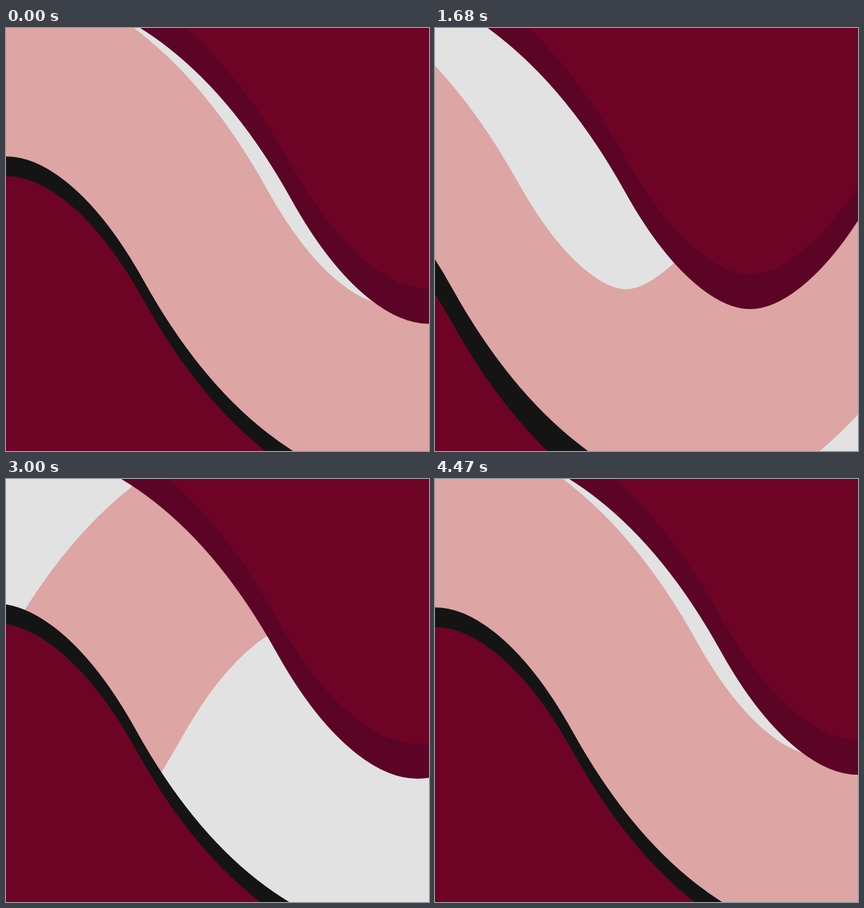
An HTML page with a canvas for the animation above (4.5 s loop, 748 by 748 pixels).

```html
<!DOCTYPE html>
<html>
<head>
<meta charset="utf-8">
<style>
html, body { margin: 0; height: 100%; overflow: hidden; background: #6e0425; }
canvas { display: block; }
</style>
</head>
<body>
<canvas id="stage" width="748" height="748"></canvas>
<script>
const ctx = document.getElementById('stage').getContext('2d');
const SIZE = 748, PERIOD = 2 * SIZE, STEPS = 149, STEP_MS = 30, MID = 375;

// Looping keys: [step, half thickness of the band, lead of the pink ribbon]
const KEYS = [
  [0, 149, -73], [36, 128.5, -107], [56, 175, -220],
  [72, 161, -71], [100, 142, 548], [133, 107, 229.5]
];

function key(i) {
  const n = KEYS.length, lap = Math.floor(i / n);
  const [step, ...values] = KEYS[i - lap * n];
  return [step + lap * STEPS, ...values];
}

// Smooth periodic curve through one column of the keys
function sample(step, col) {
  let i = 0;
  while (key(i + 1)[0] <= step) i++;
  const [a, b, c, d] = [-1, 0, 1, 2].map(k => key(i + k));
  const span = c[0] - b[0], u = (step - b[0]) / span;
  const slopeB = (c[col] - a[col]) / (c[0] - a[0]) * span;
  const slopeC = (d[col] - b[col]) / (d[0] - b[0]) * span;
  const u2 = u * u, u3 = u2 * u;
  return (2 * u3 - 3 * u2 + 1) * b[col] + (u3 - 2 * u2 + u) * slopeB
       + (3 * u2 - 2 * u3) * c[col] + (u3 - u2) * slopeC;
}

function wave(crest, shiftY, width, color) {
  const first = ((crest % PERIOD) + PERIOD) % PERIOD - 2 * PERIOD;
  const y = MID + shiftY;
  ctx.beginPath();
  ctx.moveTo(first - 374, y);
  for (let i = 0; i < 8; i++) {
    const x = first + i * SIZE, pull = y + (i % 2 ? 396 : -396);
    ctx.bezierCurveTo(x - 154, pull, x + 154, pull, x + 374, y);
  }
  ctx.lineWidth = width;
  ctx.strokeStyle = color;
  ctx.stroke();
}

function draw(step) {
  const crest = -3 * PERIOD * step / STEPS;
  const width = 2 * sample(step, 1);
  const lip = 35 + 27 * Math.exp(-(((step - 54) / 13) ** 2));

  ctx.globalCompositeOperation = 'source-over';
  ctx.clearRect(0, 0, SIZE, SIZE);
  wave(crest, 0, width, '#e2e2e2');
  ctx.globalCompositeOperation = 'source-atop';
  wave(crest + sample(step, 2), 0, width + 70, '#dda5a3');

  // Everything else lies beneath the band
  ctx.globalCompositeOperation = 'destination-over';
  wave(crest, -62, width, '#5c0425');
  wave(crest, lip, width, '#141414');
  ctx.fillStyle = '#6e0425';
  ctx.fillRect(0, 0, SIZE, SIZE);
}

function tick(now) {
  draw(Math.floor((now + 1) / STEP_MS) % (STEPS + 1));
  requestAnimationFrame(tick);
}
draw(0);
requestAnimationFrame(tick);
</script>
</body>
</html>
```
